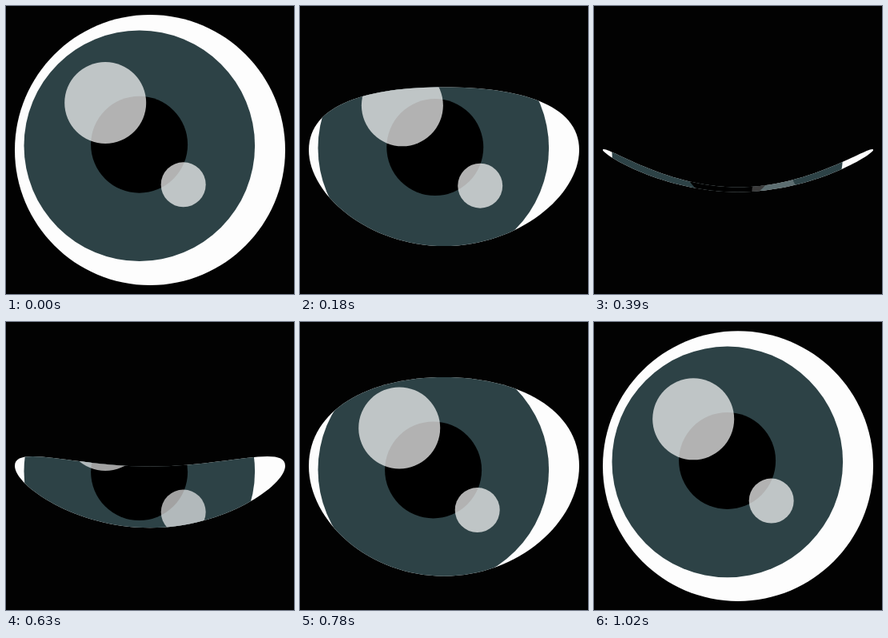
Write an HTML page that moves like this. It is 360 px wide and 360 px high and loops after 1.05 s.

```html
<!DOCTYPE html>
<html lang="en">
<head>
<meta charset="utf-8">
<title>Blinking eye</title>
<style>
  html, body { margin: 0; width: 100%; height: 100%; overflow: hidden; background: #020202; }
  svg { display: block; width: 100vw; height: 100vh; }
</style>
</head>
<body>
<svg viewBox="0 0 360 360">
  <defs><clipPath id="lids"><path id="opening"/></clipPath></defs>
  <path id="white" fill="#fdfdfd"/>
  <g clip-path="url(#lids)">
    <circle id="iris" cx="166.8" cy="174.7" r="144.3" fill="#2d4246"/>
    <circle id="pupil" cx="166.6" cy="173.2" r="60.5" fill="#000"/>
    <g id="shine" fill="#fbfbfb">
      <circle id="bigShine" cx="124.2" cy="121" r="51"/>
      <circle id="smallShine" cx="221.7" cy="223.3" r="28"/>
    </g>
  </g>
</svg>
<script>
const LOOP = 1050, STEP = 30;
const SHUT = 450, OPEN = 1035;              // lids fully closed, fully open again
const LOW = 570, RISE = 680;                // eye reaches its lowest point, starts back up
const DARK = 430, FADE = 120, GLOW = 220;   // highlights go out and return

const el = id => document.getElementById(id);
const mix = (a, b, k) => a + (b - a) * k;
const clamp = x => Math.min(1, Math.max(0, x));
const progress = (t, from, to) => clamp((t - from) / (to - from));
const smooth = u => u * u * (3 - 2 * u);

// How far each part sways sideways and sinks during the blink
const parts = [
  { id: 'iris', sway: 0, sink: 12, delay: 0 },
  { id: 'pupil', sway: 2.6, sink: 14.3, delay: 0 },
  { id: 'bigShine', sway: 4.4, sink: 14, delay: 0 },
  { id: 'smallShine', sway: 4.2, sink: 14.3, delay: 85 }
];

// cubic-bezier(.46, 0, .38, 1), solved by bisection
function ease(x) {
  let lo = 0, hi = 1, u = x;
  for (let i = 0; i < 24; i++) {
    u = (lo + hi) / 2;
    const v = 1 - u;
    if (1.38 * u * v * v + 1.14 * u * u * v + u * u * u < x) lo = u; else hi = u;
  }
  return smooth(u);
}

// The circle's four arcs fold down into one shallow curve as k goes to 1
function lidPath(k) {
  const top = mix(11, 230.4, k), bottom = mix(349, 230.4, k);
  const up = mix(86.7, 172, k), down = mix(273.3, 184, k);
  return `M11 180C11 ${up} 86.7 ${top} 180 ${top}S349 ${up} 349 180`
    + `C349 ${down} 273.3 ${bottom} 180 ${bottom}S11 ${down} 11 180Z`;
}

function draw(t) {
  const closed = ease(progress(t, 0, SHUT)) - ease(progress(t, SHUT, OPEN));
  const d = lidPath(closed);
  el('white').setAttribute('d', d);
  el('opening').setAttribute('d', d);

  const side = Math.sin(Math.PI * progress(t, 0, LOW));
  const back = smooth(progress(t, RISE, LOOP));
  for (const { id, sway, sink, delay } of parts) {
    const depth = smooth(progress(t, delay, LOW)) - back;
    el(id).setAttribute('transform', `translate(${sway * side} ${sink * depth})`);
  }

  const light = t < DARK ? (DARK - t) / FADE : (t - DARK) / GLOW;
  for (const shine of el('shine').children) {
    shine.setAttribute('opacity', 0.71 * clamp(light));
  }
}

const start = performance.now();
function tick() {
  const t = (performance.now() - start) % LOOP;
  draw(Math.floor(t / STEP) * STEP);
  requestAnimationFrame(tick);
}
draw(0);
requestAnimationFrame(tick);
</script>
</body>
</html>
```
